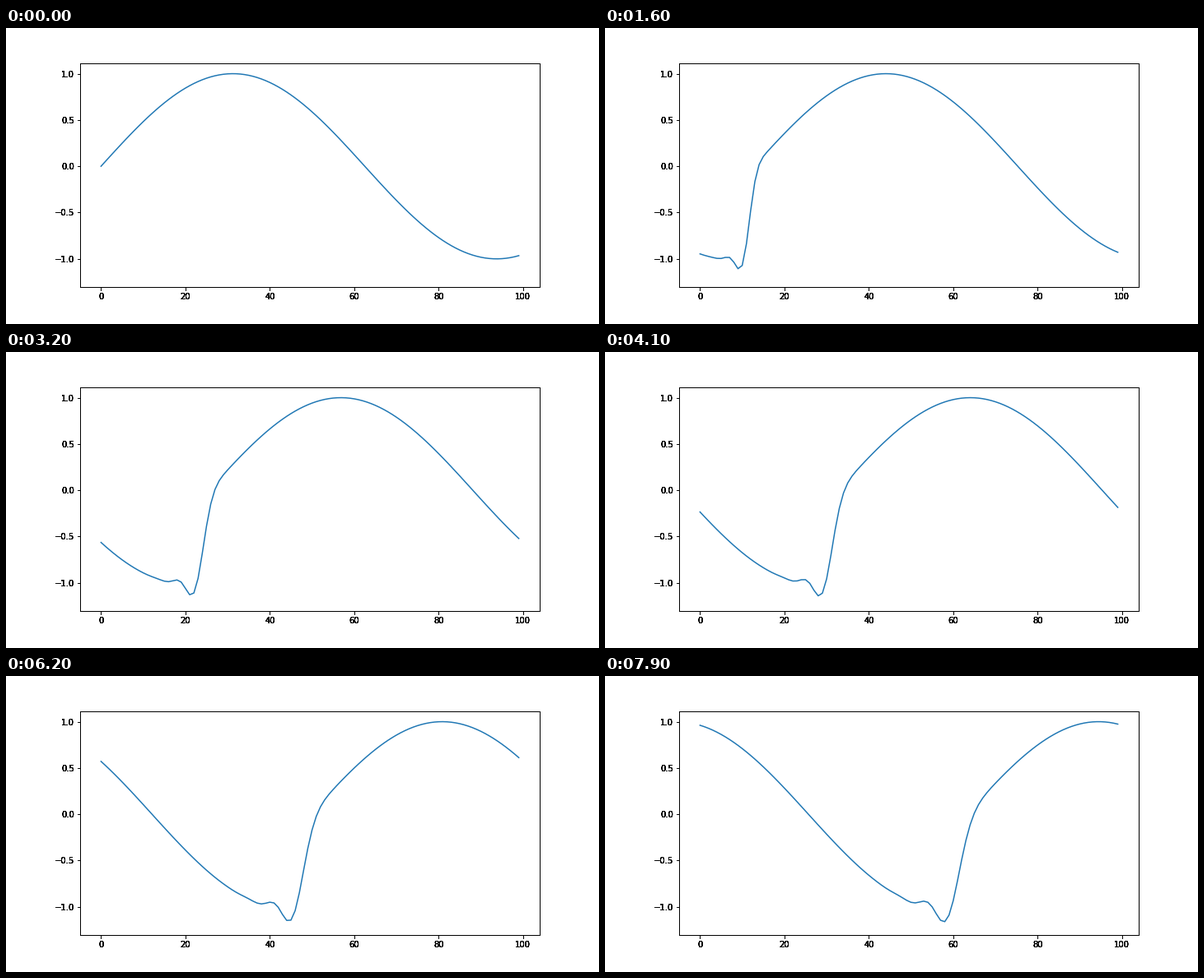
These frames come from a looping animation (720 px wide and 360 px high, 8 s). A matplotlib script:

```python
import numpy as np
import matplotlib.pyplot as plt
from matplotlib.animation import FuncAnimation

N, FRAMES = 100, 80
COURANT = 0.8
LAYERS = 6  # stacked axes give the heavy, hard-edged ticks and labels

plt.rcParams.update({"font.family": "DejaVu Sans", "font.size": 10})


def lax_wendroff(u, c):
    """One periodic step of the linear advection equation."""
    left, right = np.roll(u, 1), np.roll(u, -1)
    return u - c / 2 * (right - left) + c**2 / 2 * (right - 2 * u + left)


def solve():
    states = [np.sin(2 * np.pi * np.arange(N) / 125)]
    while len(states) < FRAMES:
        states.append(lax_wendroff(states[-1], COURANT))
    return states


def add_layer(fig, face):
    ax = fig.add_axes([0.125, 0.125, 0.775, 0.755], facecolor=face)
    ax.set(xlim=(-4.95, 103.95), ylim=(-1.304, 1.1097),
           xticks=range(0, 101, 20), yticks=np.arange(-1, 1.1, 0.5))
    return ax


states = solve()
fig = plt.figure(figsize=(10, 5), dpi=72, facecolor="white")
for i in range(LAYERS):
    ax = add_layer(fig, "none" if i else "white")
line, = ax.plot(states[0], color="#1f77b4", lw=1.5)


def update(frame):
    line.set_ydata(states[frame])
    return line,


anim = FuncAnimation(fig, update, frames=FRAMES, interval=100,
                     repeat=True, repeat_delay=0)
plt.show()
```
